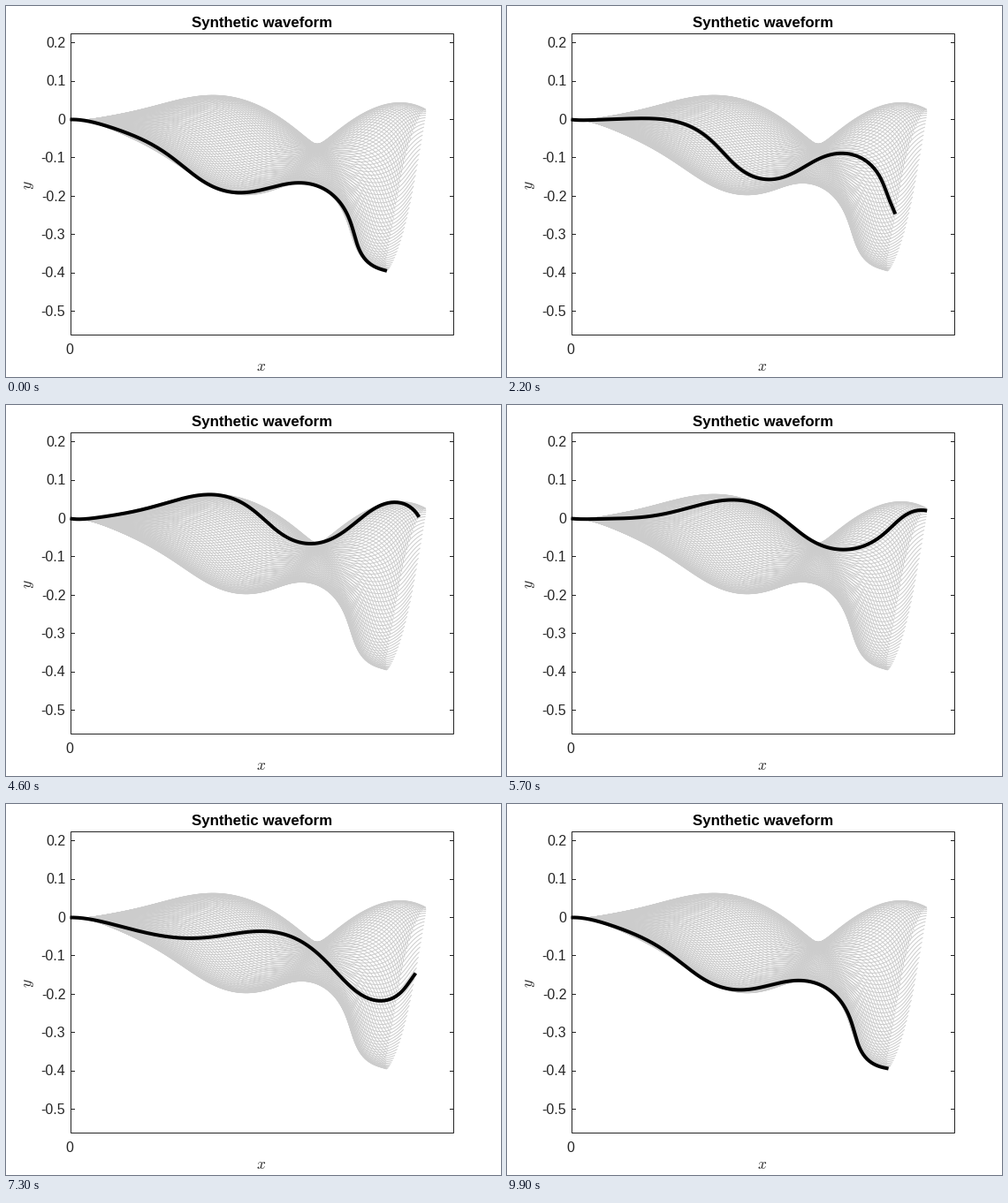
A matplotlib script that plays this animation: 560 px wide and 420 px high, repeating every 10 s.

```python
import numpy as np
import matplotlib.pyplot as plt
from matplotlib.animation import FuncAnimation
from matplotlib.collections import LineCollection
from matplotlib.patches import Rectangle

W, H, DPI = 560, 420, 70
PX = 72 / DPI                      # points per pixel
FRAMES, INTERVAL = 100, 100
LEFT, RIGHT, TOP, BOTTOM = 72, 505, 31, 372
Y0, LENGTH = 128, 433.8            # height of y = 0, pixels per unit
INK = "0.15"

plt.rcParams["font.family"] = "Liberation Sans"
plt.rcParams["mathtext.fontset"] = "cm"

S = np.linspace(0, 1, 241)         # arc length along the filament
KEYS = np.append(np.arange(10, 411, 40), 430) / LENGTH


def profile(*values):
    """Smooth curve along the filament through a few key values."""
    return np.polyval(np.polyfit(KEYS, values, 8), S)


# Tangent angle: static bend + travelling wave + weak second harmonic.
bend = profile(-.05, -.10, -.112, -.198, -.275, -.318,
               -.178, -.116, -.267, -.397, -.302, -.307)
amp = profile(.06, .28, .40, .45, .50, .508, .455, .637, .88, .965, 1.07, 1.12)
lag = np.radians(profile(138, 140.5, 157, 189, 238.5, 297.6,
                         375.4, 448.5, 496, 546, 609, 641))
amp2 = 0.19 * S ** 2.5
lag2 = 15.9 * S - 0.44


def integrate(f):
    steps = (f[1:] + f[:-1]) / 2 * np.diff(S)
    return np.concatenate([[0], np.cumsum(steps)])


def filament(t):
    a = 2 * np.pi * t
    angle = bend + amp * np.cos(a - lag) + amp2 * np.cos(2 * a - lag2)
    return np.column_stack([LEFT + LENGTH * integrate(np.cos(angle)),
                            Y0 - LENGTH * integrate(np.sin(angle))])


curves = [filament(i / FRAMES) for i in range(FRAMES)]

fig = plt.figure(figsize=(W / DPI, H / DPI), dpi=DPI, facecolor="white")
ax = fig.add_axes([0, 0, 1, 1])
ax.set_xlim(-0.5, W - 0.5)
ax.set_ylim(H - 0.5, -0.5)
ax.axis("off")


def label(x, y, text, size=16, color=INK, ha="center", va="baseline", **kw):
    ax.text(x, y, text, fontsize=size * PX, color=color, ha=ha, va=va, **kw)


ax.add_collection(LineCollection([c[::2] for c in curves], colors="0.8",
                                 linewidths=PX, zorder=1))
ax.add_patch(Rectangle((LEFT, TOP), RIGHT - LEFT, BOTTOM - TOP, fill=False,
                       edgecolor=INK, linewidth=PX, snap=True, zorder=2))

for k in range(-5, 3):
    y = Y0 - k * LENGTH / 10
    for x, d in ((LEFT, 4), (RIGHT, -4)):
        ax.plot([x, x + d], [round(y)] * 2, color=INK, lw=PX, snap=True, zorder=2)
    label(66.8, y + 5.3, f"{k / 10:g}", ha="right")

label(71.3, 394, "0")
label(289.3, 24, "Synthetic waveform", 16.85, "black", weight="bold")
label(288, 413, "$x$", 17.6)
label(25, 202.5, "$y$", 17.6, va="center", rotation=90)

line, = ax.plot([], [], color="black", lw=4 * PX, solid_capstyle="butt",
                solid_joinstyle="round", zorder=3)


def update(i):
    line.set_data(*curves[i % FRAMES].T)
    return line,


ani = FuncAnimation(fig, update, frames=FRAMES, interval=INTERVAL,
                    repeat=True, repeat_delay=0, blit=False)
plt.show()
```
